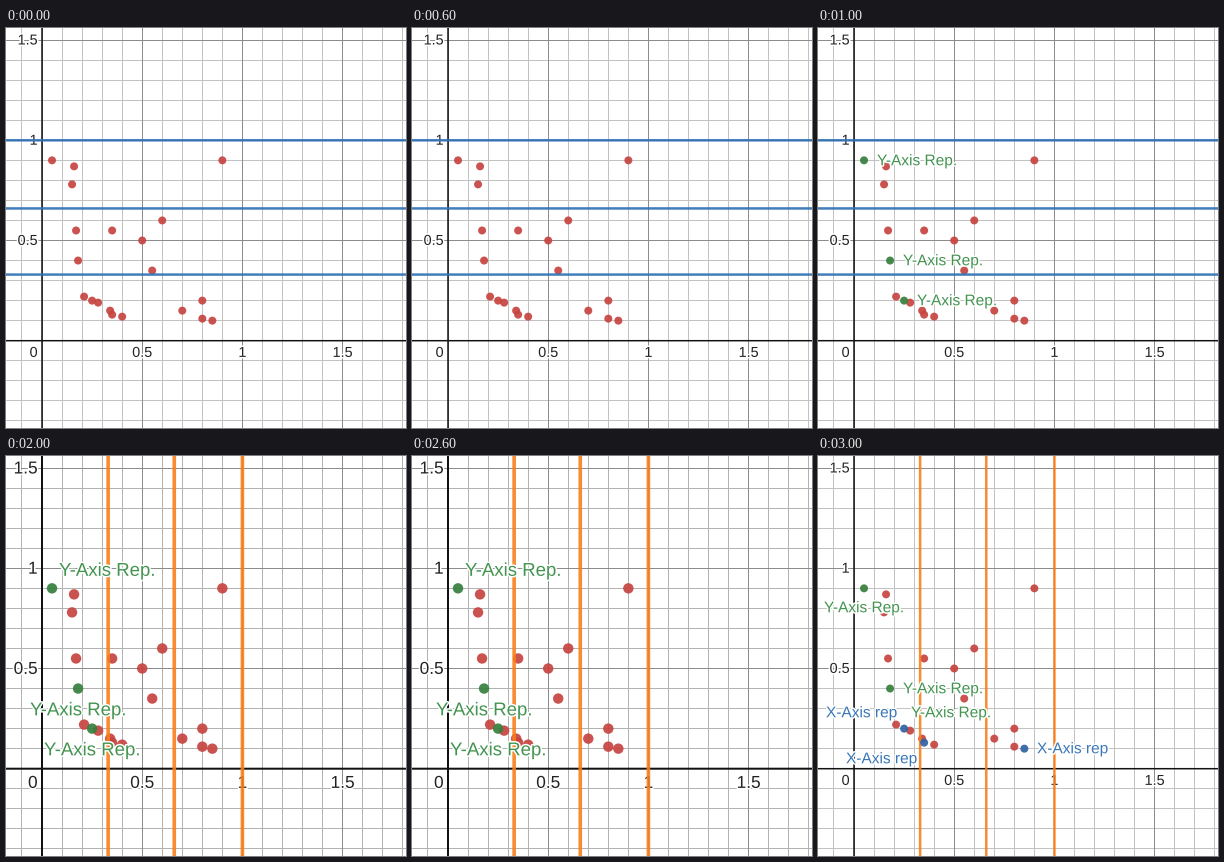
Recreate the animation shown at these times as a matplotlib script. Size 400 by 400 pixels, loop 4 s.

```python
import matplotlib.pyplot as plt
from matplotlib.animation import FuncAnimation
from matplotlib.patches import Circle
from matplotlib.patheffects import withStroke

plt.rcParams["font.family"] = "Liberation Sans"
plt.rcParams["text.hinting"] = "none"

SIZE, DPI = 400, 100
PT = 72 / DPI
X0, Y0, UNIT = 36, 312.7, 200.4
RED, GREEN, BLUE, ORANGE = "#c74440", "#35803d", "#2d70b3", "#fa7e19"
THIRDS = (0.33, 0.66, 1)

POINTS = [
    (0.05, 0.9), (0.16, 0.87), (0.15, 0.78), (0.17, 0.55), (0.18, 0.4),
    (0.21, 0.22), (0.25, 0.2), (0.28, 0.19), (0.34, 0.15), (0.35, 0.13),
    (0.4, 0.12), (0.35, 0.55), (0.5, 0.5), (0.6, 0.6), (0.55, 0.35),
    (0.7, 0.15), (0.8, 0.2), (0.8, 0.11), (0.85, 0.1), (0.9, 0.9),
]
Y_REPS = [(0.05, 0.9), (0.18, 0.4), (0.25, 0.2)]
X_REPS = [(0.25, 0.2), (0.35, 0.13), (0.85, 0.1)]

# Label positions are the left edge and vertical middle, in pixels.
SCENES = [
    dict(rows=True),
    dict(rows=True, y_reps=Y_REPS, y_labels=[(59, 132), (85, 232), (99, 272)]),
    dict(rows=False, large=True, y_reps=Y_REPS,
         y_labels=[(53, 113.5), (24, 253), (38, 293)]),
    dict(rows=False, y_reps=Y_REPS[:2], x_reps=X_REPS,
         y_labels=[(6, 151), (85, 232), (93, 256)],
         x_labels=[(8, 256), (28, 302), (219, 292)]),
]

fig = plt.figure(figsize=(SIZE / DPI, SIZE / DPI), dpi=DPI, facecolor="white")
ax = fig.add_axes([0, 0, 1, 1])


def px(x):
    return X0 + x * UNIT


def py(y):
    return Y0 - y * UNIT


def line(width, color, x=None, y=None, **style):
    xs = [0, SIZE] if x is None else [x, x]
    ys = [0, SIZE] if y is None else [y, y]
    ax.plot(xs, ys, lw=width * PT, color=color, snap=False, **style)


def text(x, y, label, size, color, ha="left", zorder=6):
    ax.text(x, y + 0.34 * size, label, fontsize=size * PT, color=color,
            ha=ha, va="baseline", zorder=zorder,
            path_effects=[withStroke(linewidth=3 * PT, foreground="white")])


def draw_grid(large):
    minor = "#b2b2b2" if large else "#c2c2c2"
    for k in range(-5, 20):
        major = k % 5 == 0
        color = "#8c8c8c" if major else minor
        zorder = 1.5 if major else 1
        line(1, color, x=int(px(k / 10)) + 0.5, zorder=zorder)
        line(1, color, y=int(py(k / 10)) + 0.5, zorder=zorder)
    width = 2 if large else 1.5
    line(width, "#111111", x=X0, zorder=2)
    line(width, "#111111", y=Y0, zorder=2)


def draw_ticks(large):
    size = 17.3 if large else 14.4
    below = 326 if large else 324
    right = 31.6
    ticks = [(right, below, "0", "right")]
    for v in (0.5, 1, 1.5):
        ticks.append((px(v), below, f"{v:g}", "center"))
        ticks.append((right, py(v) - 0.5, f"{v:g}", "right"))
    for x, y, label, ha in ticks:
        text(x, y, label, size, "#222222", ha, zorder=2.5)


def draw_dots(points, color, radius, zorder):
    for x, y in points:
        ax.add_patch(Circle((px(x), py(y)), radius, color=color, lw=0,
                            alpha=0.92, zorder=zorder))


def draw(i):
    scene = SCENES[i]
    large = scene.get("large", False)
    ax.clear()
    ax.set(xlim=(0, SIZE), ylim=(SIZE, 0))
    ax.axis("off")
    draw_grid(large)
    draw_ticks(large)

    y_reps, x_reps = scene.get("y_reps", []), scene.get("x_reps", [])
    radius = 5.2 if large else 4
    plain = [p for p in POINTS if p not in y_reps + x_reps]
    draw_dots(plain, RED, radius, 3)
    draw_dots(y_reps, GREEN, radius, 5)
    draw_dots(x_reps, "#2f62a3", radius, 5)

    width = 3.6 if large else 2.5
    for v in THIRDS:
        if scene["rows"]:
            line(width, BLUE, y=py(v), alpha=0.9, zorder=4)
        else:
            line(width, ORANGE, x=px(v), alpha=0.9, zorder=4)

    size = 18.6 if large else 15.45
    for x, y in scene.get("y_labels", []):
        text(x, y, "Y-Axis Rep.", size, "#439450")
    for x, y in scene.get("x_labels", []):
        text(x, y, "X-Axis rep", size, "#3977b7")


anim = FuncAnimation(fig, draw, frames=len(SCENES), init_func=lambda: None,
                     interval=1000, repeat=True, repeat_delay=0)
plt.show()
```
